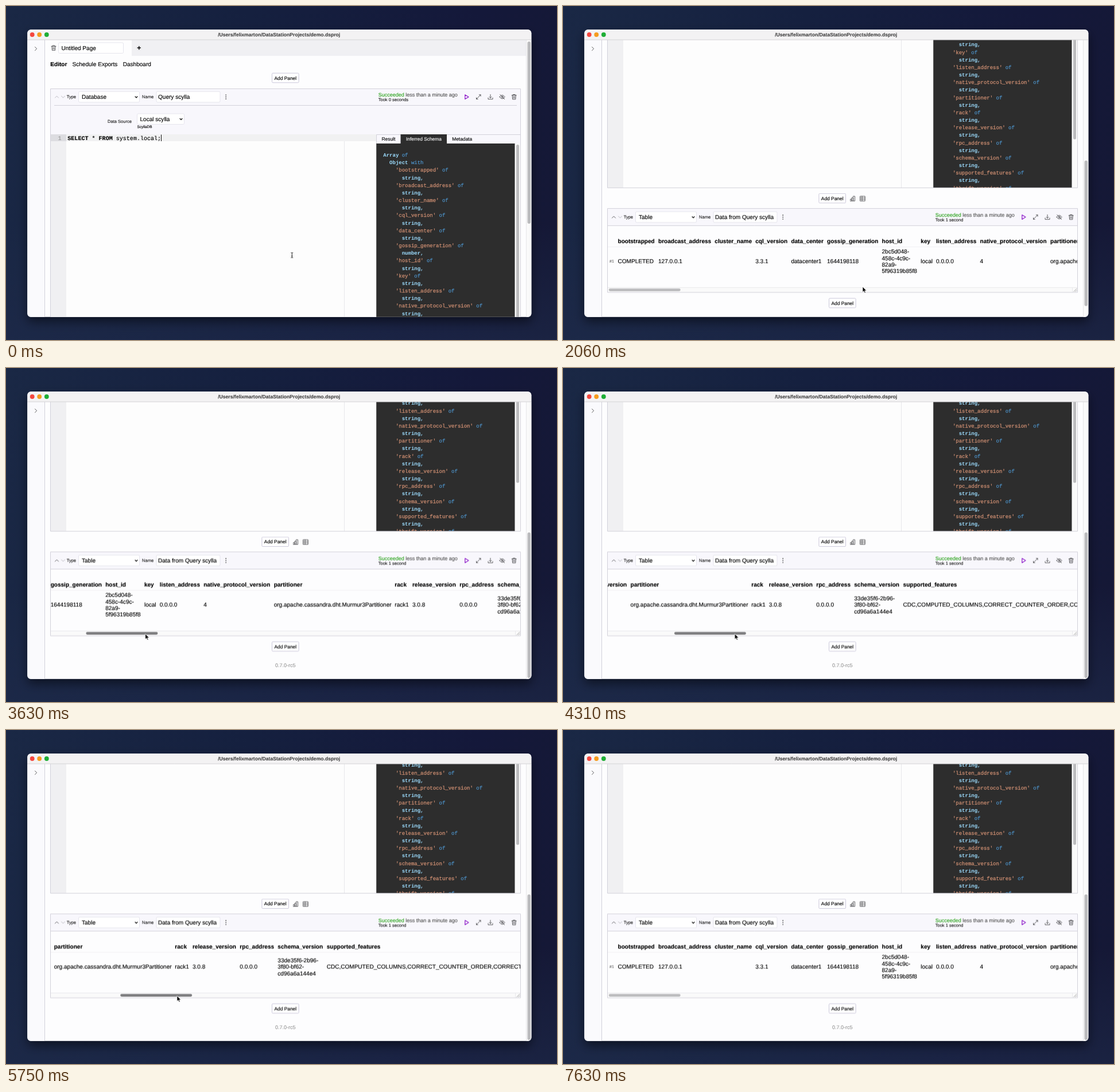
Recreate the animation shown at these times as an HTML page. Size 960 by 583 pixels, loop 7.7 s.

```html
<!DOCTYPE html>
<html lang="en">
<head>
<meta charset="utf-8">
<title>Database panel demo</title>
<style>
@property --scroll { syntax: "<number>"; inherits: true; initial-value: 0; }
@property --drag { syntax: "<number>"; inherits: true; initial-value: 0; }

html, body { margin: 0; width: 100%; height: 100%; overflow: hidden; background: #182140; }
svg { display: block; }
#stage {
  background:
    linear-gradient(to top, rgba(30, 42, 74, .6), rgba(30, 42, 74, 0) 35%),
    linear-gradient(100deg, #1a2845 0, #15203f 40%, #14183a 78%, #151835 100%);
  animation: scroll 7.7s linear infinite, drag 7.7s linear infinite;
}
text {
  font: 10.06px "Liberation Sans", Arial, sans-serif;
  color: #000; fill: currentColor; stroke: currentColor; stroke-width: .14px;
  text-rendering: geometricPrecision;
}
.b { font-weight: 700; }
.mid { font-size: 8.38px; }
.small { font-size: 7.55px; color: #222; }
.gray { color: #999; }
.light { color: #fff; }
.c { text-anchor: middle; }
.mono { font-family: "Liberation Mono", Courier, monospace; }
.status { font-size: 9.01px; color: #555; }
.ok { color: #2ba31c; }
.schema text { font: 700 9px "Liberation Mono", Courier, monospace; color: #9cdcfe; stroke: none; }
.schema .key { color: #ca8c70; font-weight: 400; stroke: currentColor; stroke-width: .28px; }
.schema .of { color: #4f97cf; font-weight: 400; stroke: currentColor; stroke-width: .2px; }
.icon { fill: none; stroke: #4c4c50; stroke-width: .9; stroke-linecap: round; stroke-linejoin: round; }
.field { fill: #fff; stroke: #e6e5ed; }
.btn { fill: #fff; stroke: #cbc8da; }
.line { stroke: #d2d1da; fill: none; }
.bar { fill: #bcbcbe; }

.page { transform: translateY(calc(var(--scroll) * -1px)); }
.thumb { transform: translateY(calc(var(--scroll) * var(--k) * 1px)); animation: grow 7.7s step-end infinite; }
.row { transform: translateX(calc(var(--drag) * -6.405px)); }
.hthumb { transform: translateX(calc(var(--drag) * 1px)); animation: grip 7.7s step-end infinite; }
.added { animation: added 7.7s step-end infinite; }
.version { font-size: 9.05px; animation: footer 7.7s step-end infinite; }
.hover { animation: hover 7.7s step-end infinite; }
.slide { animation: slide 7.7s step-end infinite; }
#cursor { animation: cursor 7.7s linear infinite; }
.beam { animation: beam 7.7s step-end infinite; }
.hand { animation: hand 7.7s step-end infinite; }

@keyframes scroll {
  0%, 1% { --scroll: 0; animation-timing-function: ease-in-out; }
  10.5%, 21.8% { --scroll: 239.7; }
  26.75% { --scroll: 390; animation-timing-function: ease-out; }
  31.7%, 100% { --scroll: 422.5; }
}
@keyframes drag {
  0%, 39.6% { --drag: 0; }
  47.14% { --drag: 59.6; }
  55.97% { --drag: 114; animation-timing-function: ease-out; }
  65.6% { --drag: 180; animation-timing-function: ease-in; }
  74.68% { --drag: 119.6; }
  83.8%, 100% { --drag: 0; }
}
@keyframes cursor {
  0%, 7% { transform: translate(498px, 435px); }
  11% { transform: translate(488px, 486px); }
  14%, 32.5% { transform: translate(522px, 490px); animation-timing-function: ease-in-out; }
  39.6% { transform: translate(183px, 464px); }
  47.14% { transform: translate(242.5px, 464px); }
  55.97% { transform: translate(299px, 464px); animation-timing-function: ease-out; }
  65.6% { transform: translate(362px, 464px); animation-timing-function: ease-in; }
  74.68% { transform: translate(298px, 464px); }
  83.8%, 86% { transform: translate(182px, 464px); animation-timing-function: ease-in; }
  93%, 100% { transform: translate(205px, -20px); }
}
@keyframes grow {
  0% { --k: .6675; height: 318px; }
  18.2%, 100% { --k: .5325; height: 254px; }
}
@keyframes grip { 0% { fill: #bcbcbe; } 39% { fill: #7e7e80; } 86%, 100% { fill: #bcbcbe; } }
@keyframes added { 0% { opacity: 0; } 18.2%, 100% { opacity: 1; } }
@keyframes footer { 0% { transform: none; } 18.2%, 100% { transform: translateY(182.7px); } }
@keyframes hover { 0% { opacity: 0; } 11%, 100% { opacity: 1; } }
@keyframes slide { 0% { transform: translateX(17.5px); } 11%, 100% { transform: none; } }
@keyframes beam { 0% { opacity: 1; } 10.2%, 100% { opacity: 0; } }
@keyframes hand { 0% { opacity: 0; } 10.2% { opacity: 1; } 18.2%, 100% { opacity: 0; } }
</style>
</head>
<body>
<svg id="stage" width="960" height="583" viewBox="0 0 960 583">
  <defs>
    <filter id="shadow" x="-10%" y="-10%" width="120%" height="125%">
      <feDropShadow dx="0" dy="8" stdDeviation="9" flood-color="#000" flood-opacity=".5"/>
    </filter>
    <clipPath id="win"><rect x="37.300" y="41.300" width="878" height="501.400" rx="6"/></clipPath>
    <clipPath id="view"><rect x="68" y="59" width="848" height="484"/></clipPath>
    <clipPath id="code"><rect x="78" y="224" width="818" height="483.500"/></clipPath>
    <clipPath id="table"><rect x="78" y="774" width="818" height="116"/></clipPath>
    <g id="trash" class="icon">
      <path d="M-4-2.900H4M-1.800-2.900V-4.200H1.800V-2.900M-3.100-2.900-2.600 4.200H2.600L3.100-2.900M-1-1V2.400M1-1V2.400"/>
    </g>
    <path id="down" d="M-2.300-1.100 0 1.300 2.300-1.100" fill="none" stroke="#111" stroke-width="1.300"/>
  </defs>

  <rect x="37.300" y="41.300" width="878" height="501.400" rx="6" fill="#fdfdfe" filter="url(#shadow)"/>
  <g clip-path="url(#win)">
    <path d="M37 59.500H68V543H37Z" fill="#fafafd"/>
    <path class="line" d="M67.500 59V543"/>
    <path class="icon" d="M50.500 71.500 53.700 74.600 50.500 77.700"/>

    <g clip-path="url(#view)">
      <g class="page">
        <path d="M219 59H907V87H219Z" fill="#f0f0f3"/>
        <use href="#trash" x="83" y="73.200"/>
        <rect class="field" x="91.500" y="64" width="113" height="18.500" rx="2"/>
        <text x="96.500" y="76.700">Untitled Page</text>
        <text class="b c" x="231.800" y="77" style="font-size:12px">+</text>
        <text class="b" x="77.300" y="105.400">Editor</text>
        <text x="115.500" y="105.400">Schedule Exports</text>
        <text x="203.700" y="105.400">Dashboard</text>
        <g id="topButton"></g>

        <path d="M77.500 144.500H896.500V224H77.500Z" fill="#f8f7fc"/>
        <g id="queryHead"></g>
        <path class="line" d="M84 173.500H890"/>
        <text class="small" x="177" y="203.800">Data Source</text>
        <rect class="field" x="228.500" y="188" width="82" height="18.500" rx="2"/>
        <text x="233.500" y="200.800">Local scylla</text>
        <use href="#down" x="305" y="197.200"/>
        <text x="228.500" y="212.700" style="font-size:6.400px">ScyllaDB</text>

        <g clip-path="url(#code)">
          <path d="M78 224H645V708H78Z" fill="#fdfdfd"/>
          <path d="M78 224H105V708H78Z" fill="#f0f0f2"/>
          <path d="M78 224H105V236H78Z" fill="#dddde1"/>
          <path d="M105 224H645V236H105Z" fill="#f1f1f2"/>
          <path d="M589.500 236V708" stroke="#e8e8ea"/>
          <text class="mono gray" x="90.500" y="233.600">1</text>
          <text class="mono" x="107.300" y="233.600"><tspan class="b">SELECT</tspan> * <tspan class="b">FROM</tspan> system.local;</text>
          <path d="M270.500 224.500V236" stroke="#111"/>
          <path d="M645 224H896V241H645Z" fill="#f8f7fc"/>
          <path d="M645.500 240V224.500H896" class="line"/>
          <path d="M687.500 224H768V240H886.700V708H645.200V240H687.500Z" fill="#2d2d2d"/>
          <path d="M886.700 240.500H896V708H886.700Z" fill="#fafafa"/>
          <rect class="bar" x="889" y="242" width="5" height="381" rx="2.500"/>
          <text class="mid" x="654.500" y="235.200">Result</text>
          <text class="mid light" x="697" y="235.200">Inferred Schema</text>
          <text class="mid" x="777.200" y="235.200">Metadata</text>
          <g id="schema" class="schema"></g>
        </g>
        <path class="line" d="M77.500 144.500H896.500V707.500H77.500Z"/>

        <g id="addButton" class="slide"></g>
        <g class="icon hover">
          <path d="M500.500 727.500h2.600v3h-2.600zM503.100 725h2.700v5.500h-2.700zM505.800 722.200h2.700v8.300h-2.700z"/>
          <path d="M518 722.200h8.200v8.300H518zM518 725h8.200M518 727.800h8.200M521 722.200v8.300"/>
        </g>

        <g class="added">
          <path d="M77.500 743.500H896.500V773.500H77.500Z" fill="#f8f7fc"/>
          <g id="tableHead"></g>
          <path class="line" d="M77.500 773.500H896.500"/>
          <g clip-path="url(#table)">
            <path d="M78 810.500H896" stroke="#f2f1f5"/>
            <g id="row" class="row"></g>
            <path d="M78 881H896V890H78Z" fill="#fafafa"/>
            <path d="M78 881.500H896M887.500 881V890" stroke="#e9e9ec"/>
            <rect class="hthumb" x="79.700" y="883.200" width="125" height="4.800" rx="2.400"/>
            <path class="icon" style="stroke:#999" d="M890 888.500l5-5M893 888.500l2-2"/>
          </g>
          <path class="line" d="M77.500 743.500H896.500V890H77.500Z"/>
          <g id="lastButton"></g>
        </g>
        <text class="version gray c" x="486.800" y="761.500">0.7.0-rc5</text>
      </g>
      <path d="M906.500 59H916V544H906.500Z" fill="#fafafa"/>
      <path d="M906.500 59V544" stroke="#e6e6e9"/>
      <rect class="bar thumb" x="908.500" y="62" width="5.500" height="318" rx="2.700"/>
    </g>

    <path d="M37 41H916V59H37Z" fill="#f3f2f3"/>
    <path d="M37 59H916" stroke="#d3d2d5"/>
    <circle cx="45.700" cy="50" r="3.900" fill="#f4473f"/>
    <circle cx="58.200" cy="50" r="3.900" fill="#f59c1f"/>
    <circle cx="70.800" cy="50" r="3.900" fill="#1fae36"/>
    <text class="b c" x="475.700" y="53" style="font-size:8.600px;color:#444">/Users/felixmarton/DataStationProjects/demo.dsproj</text>
  </g>

  <g id="cursor" stroke-linejoin="round">
    <path class="beam" d="M-1.500-4.500Q.3-4.500.3-3.500V3.500Q.3 4.500-1.500 4.500M2.100-4.500Q.3-4.500.3-3.500M.3 3.500Q.3 4.500 2.100 4.500M-.7 1.500H1.300" fill="none" stroke="#111" stroke-width=".9"/>
    <path class="hand" transform="translate(-3 0)" d="M2 1.200Q2 0 3 0T4 1.200V4Q5 3.400 5.600 4.200 6.600 3.800 7 4.800 8.300 4.600 8.300 6V8Q8.200 9.500 7.300 11H3Q2 9 .2 7-.6 5.600.6 5.600L2 6.800Z" fill="#fff" stroke="#111" stroke-width=".9"/>
    <path class="added" d="M0 0V9.400L2.200 7.500 3.700 10.900 5.300 10.200 3.800 6.900H6.700Z" fill="#000" stroke="#fff" stroke-width=".7"/>
  </g>
</svg>
<script>
const put = (id, html) => { document.getElementById(id).innerHTML = html; };
const text = (x, y, s, cls = "") => `<text x="${x}" y="${y}" class="${cls}">${s}</text>`;

const button = (x, y) => `<rect class="btn" x="${x - 23.3}" y="${y - 8.3}" width="46.600" height="16.600" rx="1.500"/>`
  + text(x, y + 3, "Add Panel", "mid c");

// Panel header, centred vertically on y.
const header = (y, type, name, took, up) => `<g transform="translate(0 ${y})">
  <path class="icon" style="stroke:${up}" d="M85.500 1.500 88.500-1.500 91.500 1.500"/>
  <path class="icon" style="stroke:#b5b4bb" d="M96.500-1.500 99.500 1.500 102.500-1.500"/>
  ${text(105.7, 2.6, "Type", "small")}
  <rect class="field" x="126.500" y="-9.500" width="106" height="18.800" rx="2"/>
  ${text(132, 3.6, type)}
  <use href="#down" x="227" y="0"/>
  ${text(237, 2.6, "Name", "small")}
  <rect class="field" x="262" y="-9.500" width="111" height="18.800" rx="2"/>
  ${text(265, 3.6, name)}
  <path d="M383.200-3.400v0M383.200 0v0M383.200 3.400v0" stroke="#333" stroke-width="1.700" stroke-linecap="round"/>
  ${text(648.7, -1, '<tspan class="ok">Succeeded</tspan> less than a minute ago', "status")}
  ${text(648.7, 7.5, took, "small")}
  <path class="icon" style="stroke:#8a14c8;stroke-width:1.200" d="M799.800-3.800 806 0 799.800 3.800Z"/>
  <path class="icon" d="M819.500 3.800 827-3.800M824.300-3.800H827V-1.200M819.500 1.200V3.800H822.200M844-4.200V1.800M842-.2 844 1.800 846-.2M840 1.500V4H848V1.500"/>
  <path class="icon" d="M860 0Q864.500-6.500 869.200 0 864.500 6.500 860 0ZM860.800-4 868.600 4"/>
  <circle class="icon" cx="864.600" cy="0" r="1.500"/>
  <use href="#trash" x="885.200" y="0"/></g>`;

const fields = ["bootstrapped", "broadcast_address", "cluster_name", "cql_version", "data_center",
  "gossip_generation", "host_id", "key", "listen_address", "native_protocol_version", "partitioner",
  "rack", "release_version", "rpc_address", "schema_version", "supported_features", "thrift_version"];

const features = ["CDC", "COMPUTED_COLUMNS", "CORRECT_COUNTER_ORDER", "CORRECT_IDX_TOKEN_IN_SECONDARY_INDEX",
  "CORRECT_NON_COMPOUND_RANGE_TOMBSTONES", "CORRECT_STATIC_COMPACT_IN_MC", "COUNTERS",
  "DIGEST_FOR_NULL_VALUES", "DIGEST_INSENSITIVE_TO_EXPIRY"].join();

const values = ["COMPLETED", "127.0.0.1", "", "3.3.1", "datacenter1", "1644198118",
  "2bc5d048- 458c-4c9c- 82a9- 5f96319b85f8", "local", "0.0.0.0", "4",
  "org.apache.cassandra.dht.Murmur3Partitioner", "rack1", "3.0.8", "0.0.0.0",
  "33de35f6-2b96- 3f80-bf62- cd96a6a144e4", features];

const columns = [95.5, 166, 264.3, 335.2, 397.4, 460, 555.5, 623.3, 650, 726.5, 849, 1059.7, 1090.3, 1172.7, 1238.7, 1324];

const of = ' <tspan class="of">of</tspan>';
const lines = [[0, "Array" + of], [2, 'Object <tspan class="of">with</tspan>']];
for (const f of fields) {
  lines.push([4, `'${f}'${of}`, "key"], [6, f === "gossip_generation" ? "number," : "string,"]);
}
put("schema", lines.map(([indent, s, cls], i) => text(657.3 + indent * 5.4, 263.1 + i * 13.165, s, cls)).join(""));

put("row", '<text x="81" y="838.200" style="font-size:7px;color:#666">#1</text>' + columns.map((x, i) => {
  const parts = values[i].split(" ");
  const top = 839.2 - (parts.length - 1) * 5.7;
  return text(x, 804.2, fields[i], "b") + parts.map((s, n) => text(x, top + n * 11.4, s)).join("");
}).join(""));

put("queryHead", header(158.7, "Database", "Query scylla", "Took 0 seconds", "#b5b4bb"));
put("tableHead", header(758.6, "Table", "Data from Query scylla", "Took 1 second", "#4c4c50"));
put("topButton", button(486.8, 125.5));
put("addButton", button(469.2, 725.8));
put("lastButton", button(486.8, 908.6));
</script>
</body>
</html>
```
